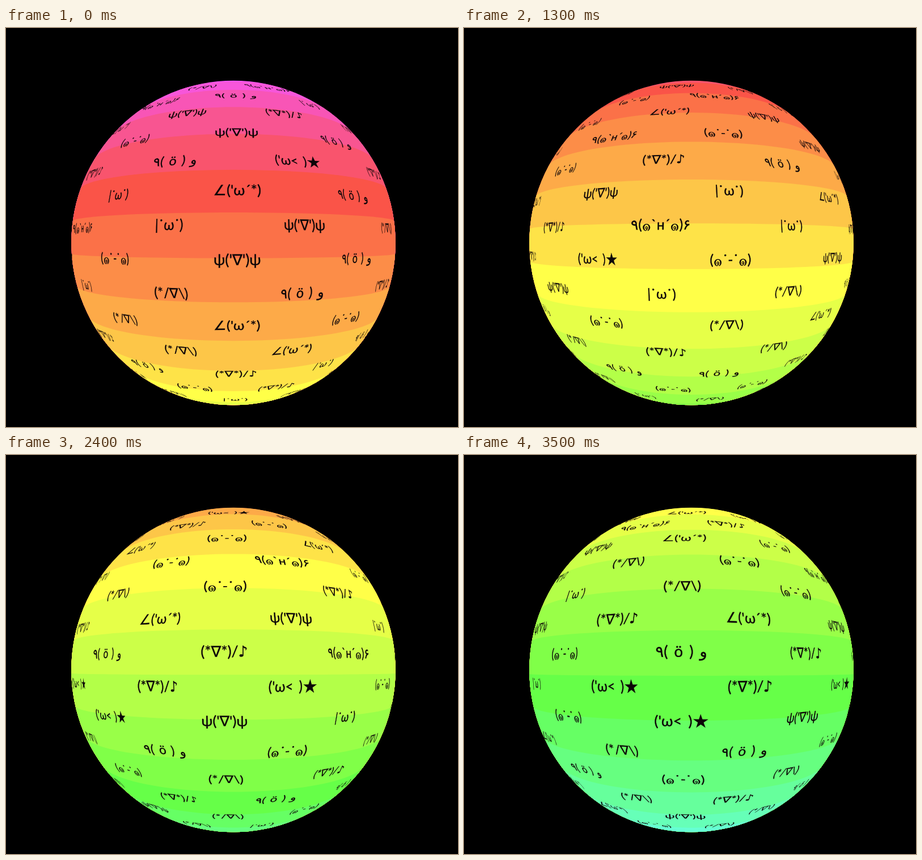
Write an HTML page with a canvas that moves like this. It is 797x703 px and loops after 3.6 s.

```html
<!DOCTYPE html>
<html lang="en">
<head>
<meta charset="utf-8">
<title>Kaomoji globe</title>
<style>
html, body { margin: 0; width: 100%; height: 100%; overflow: hidden; background: #000; }
canvas { display: block; }
</style>
</head>
<body>
<canvas id="stage" width="797" height="703"></canvas>
<script>
const ctx = document.getElementById('stage').getContext('2d');
const W = 797, H = 703, LOOP = 3600, STEP = 100;
const CX = 401, CY = 378.5, R = 286.5;
const DIST = 2.5;                                // camera distance in radii
const F = R * Math.sqrt(DIST * DIST - 1);
const UNIT = F / (DIST - 1);                     // pixels per radius at the nearest point
const RAD = Math.PI / 180;
const COL = 360 / 11, ROW = 180 / 22, BAND = 10.6;
const FAMILY = 'Lato, "Open Sans", "Noto Sans", "DejaVu Sans", sans-serif';
const FONT = `27px ${FAMILY}`, BIG = `33px ${FAMILY}`;

const FACES = {
  P: "ψ('∇')ψ",
  N: "∠('ω´*)",
  O: "٩( ö ) و",
  W: "|˙ω˙)",
  Z: "(๑˙-˙๑)",
  H: "٩(๑`н´๑)۶",
  S: "('ω< )★",
  M: "(*∇*)/♪",
  T: "(*/∇\\)"
};

// one string per row, top to bottom; columns run from -5 to 1
const GRID = [
  'PNSPTHO', 'PHMZHOW', 'PNZNPMT', 'MTZHZPO', 'WTZMOSM', 'PMNPWNO', 'ZOMHWPT',
  'WSMSZPO', 'ZSPWTOM', 'NTOZTNZ', 'OZTMTNO', 'NTMOOMW', 'NPTZZMW', 'OZTWTWM'
];

// time, turn in degrees, text scale
const KEYS = [
  [0, 0, 0.99], [500, 16.2, 0.91], [1300, 41, 0.94], [1700, 55.7, 1.03],
  [2400, 78.8, 0.985], [3100, 97.7, 1.13], [3500, 111.3, 1.02]
];

// band number, red, green, blue
const COLORS = [
  [-7, 246, 86, 255], [-2, 250, 84, 72], [4, 255, 255, 72], [10, 102, 255, 72], [16, 102, 255, 240]
];

// linear lookup in a list of rows sorted by their first value
function sample(rows, x) {
  let i = 1;
  while (i < rows.length - 1 && rows[i][0] < x) i++;
  const a = rows[i - 1], b = rows[i];
  const u = (x - a[0]) / (b[0] - a[0]);
  return a.slice(1).map((v, n) => v + (b[n + 1] - v) * u);
}

function project(lon, lat) {
  const depth = DIST - Math.cos(lat) * Math.cos(lon);
  return [CX + F * Math.cos(lat) * Math.sin(lon) / depth, CY + F * Math.sin(lat) / depth];
}

function clipDisc(r) {
  ctx.beginPath();
  ctx.arc(CX, CY, r, 0, Math.PI * 2);
  ctx.clip();
}

// fills everything on the globe south of a latitude
function fillBelow(lat, color) {
  ctx.fillStyle = color;
  const c = 1 / (DIST * Math.cos(lat));
  if (c >= 1 || Math.cos(lat) <= 0) {
    if (lat < 0) ctx.fillRect(0, 0, W, H);
    return;
  }
  const edge = Math.acos(c);
  ctx.beginPath();
  ctx.moveTo(0, H);
  ctx.lineTo(0, project(-edge, lat)[1]);
  for (let i = 0; i <= 48; i++) ctx.lineTo(...project(edge * (i / 24 - 1), lat));
  ctx.lineTo(W, project(edge, lat)[1]);
  ctx.lineTo(W, H);
  ctx.fill();
}

function drawBands(turn) {
  const base = 3.55 - 0.972 * turn;
  const first = Math.floor((-66.5 - base) / BAND);
  const last = Math.ceil((66.5 - base) / BAND);
  for (let j = first; j <= last; j++) {
    fillBelow((base + BAND * j) * RAD, `rgb(${sample(COLORS, j).map(Math.round)})`);
  }
}

// splits a label into runs; stars and swirls are set larger
function layout(text) {
  let width = 0;
  const runs = text.split(/([★๑])/).filter(Boolean).map(part => {
    const font = /[★๑]/.test(part) ? BIG : FONT;
    ctx.font = font;
    const run = { part, font, x: width };
    width += ctx.measureText(part).width;
    return run;
  });
  return { runs, width };
}

function drawLabel(text) {
  const { runs, width } = layout(text);
  for (const { part, font, x } of runs) {
    ctx.font = font;
    ctx.fillText(part, x - width / 2, 0);
    ctx.strokeText(part, x - width / 2, 0);
  }
}

// draws a label on the plane touching the globe at the given point
function drawFace(text, lon, lat, size) {
  const sl = Math.sin(lon), cl = Math.cos(lon), sp = Math.sin(lat), cp = Math.cos(lat);
  if (cp * cl < 1 / DIST + 0.02) return;
  const depth = DIST - cp * cl;
  const k = F * size / UNIT / depth;
  const x = cp * sl / depth, y = sp / depth;
  ctx.setTransform(
    k * (cl - x * sl), k * (-y * sl),
    k * (-sp * sl - x * sp * cl), k * (cp - y * sp * cl),
    CX + F * x, CY + F * y
  );
  drawLabel(text);
}

function drawFaces(turn, size) {
  ctx.textAlign = 'left';
  ctx.textBaseline = 'middle';
  ctx.direction = 'ltr';
  ctx.wordSpacing = '4px';
  ctx.fillStyle = ctx.strokeStyle = '#0c0508';
  ctx.lineWidth = 0.4;
  GRID.forEach((row, i) => {
    const lat = (i - 6.5) * ROW * RAD;
    const shift = 0.9 + turn + (i % 2 ? 0 : COL / 2);
    [...row].forEach((key, n) => {
      drawFace(FACES[key], (shift + (n - 5) * COL) * RAD, lat, size);
    });
  });
}

function draw(t) {
  const [turn, size] = sample(KEYS, t);
  ctx.fillStyle = '#000';
  ctx.fillRect(0, 0, W, H);
  ctx.save();
  clipDisc(R - 0.7);
  drawBands(turn);
  ctx.restore();
  ctx.save();
  clipDisc(R + 1);
  drawFaces(turn, size);
  ctx.restore();
}

const start = performance.now();
function tick() {
  const t = Math.max(0, performance.now() - start) % LOOP;
  draw(Math.floor(t / STEP) * STEP);
  requestAnimationFrame(tick);
}
tick();
</script>
</body>
</html>
```
